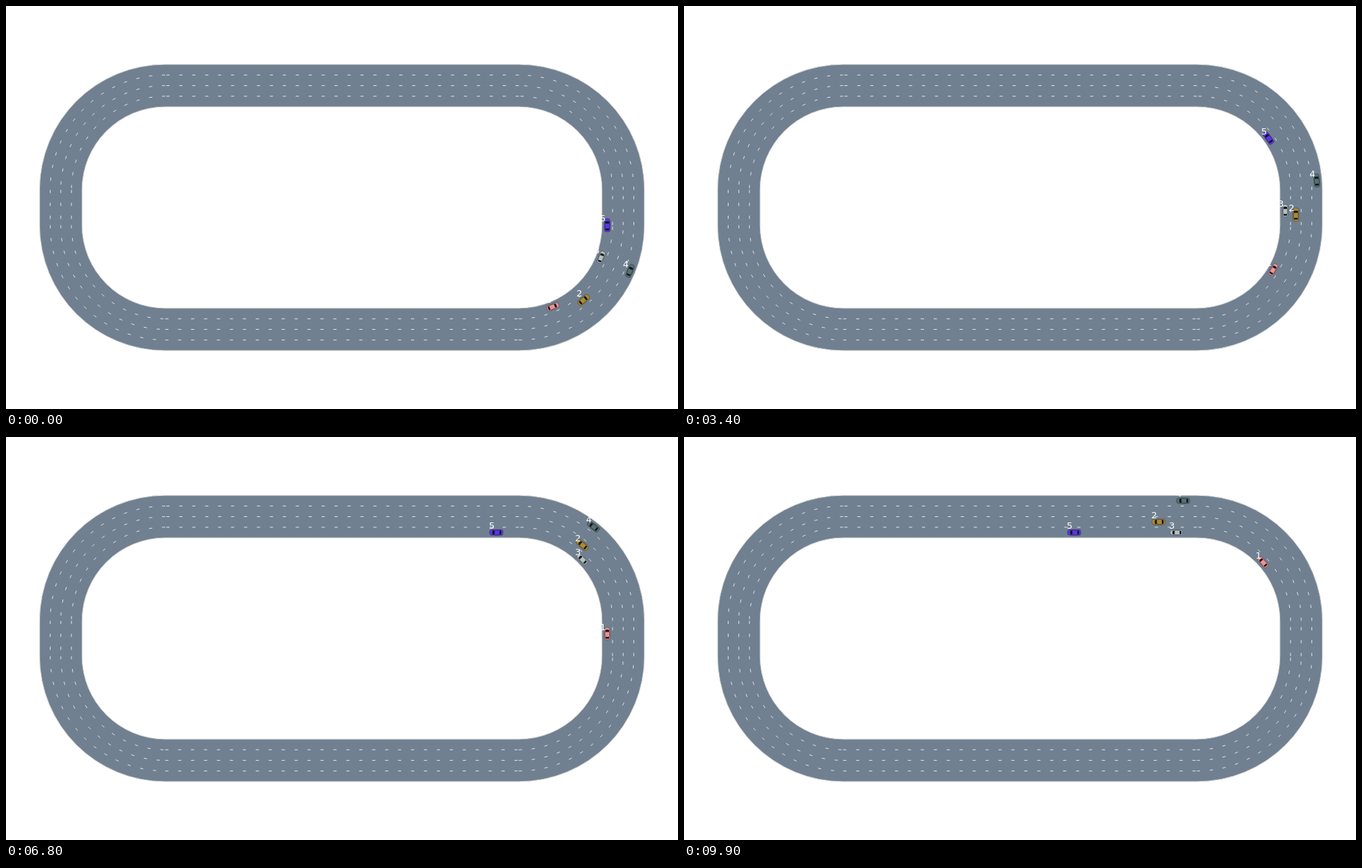
An HTML page for the animation above (10000 ms loop, 966x580 px).

```html
<!DOCTYPE html>
<html lang="en">
<head>
<meta charset="utf-8">
<title>Ring road traffic</title>
<style>
  html, body { margin: 0; width: 100%; height: 100%; overflow: hidden; background: #fff; }
  svg { display: block; width: 966px; height: 580px; }
  text { font: 13px "DejaVu Sans", sans-serif; fill: #fff; text-anchor: middle; }
</style>
</head>
<body>
<svg id="stage" viewBox="0 0 966 580"></svg>
<script>
const stage = document.getElementById('stage');
// A stadium of 100 m by 10 m straights, 25 m bends and four 3 m lanes, filling 90% of the width.
const METRE = 966 * 0.9 / 171;
const LENGTH = 100 * METRE, SIDE = 10 * METRE, LANE = 3 * METRE;
const INNER = 23.5 * METRE, OUTER = 35.5 * METRE;
const LEFT = 483 - LENGTH / 2, RIGHT = 483 + LENGTH / 2;
const TOP = 290 - SIDE / 2, BOTTOM = 290 + SIDE / 2;
const DASH = 0.9144 * METRE, GAP = 3 * DASH;
const STEP = 100, LOOP = 10000;

function add(parent, tag, attrs, text) {
  const node = document.createElementNS('http://www.w3.org/2000/svg', tag);
  for (const key in attrs) node.setAttribute(key, attrs[key]);
  if (text) node.textContent = text;
  return parent.appendChild(node);
}

function ring(radius, fill) {
  add(stage, 'rect', {
    x: LEFT - radius, y: TOP - radius, rx: radius,
    width: LENGTH + 2 * radius, height: SIDE + 2 * radius,
    fill, stroke: '#d3d3d3', 'stroke-width': 1
  });
}

// Every straight and bend starts its own dash pattern, in driving direction.
function laneMarks(r) {
  const arc = (x0, y0, x1, y1) => `M${x0} ${y0}A${r} ${r} 0 0 0 ${x1} ${y1}`;
  const parts = [
    `M${RIGHT} ${TOP - r}H${LEFT}`, `M${LEFT} ${BOTTOM + r}H${RIGHT}`,
    `M${LEFT - r} ${TOP}V${BOTTOM}`, `M${RIGHT + r} ${BOTTOM}V${TOP}`,
    arc(RIGHT + r, TOP, RIGHT, TOP - r), arc(LEFT, TOP - r, LEFT - r, TOP),
    arc(LEFT - r, BOTTOM, LEFT, BOTTOM + r), arc(RIGHT, BOTTOM + r, RIGHT + r, BOTTOM)
  ];
  for (const d of parts) {
    add(stage, 'path', {
      d, fill: 'none', stroke: '#fff', 'stroke-width': 0.9,
      'stroke-opacity': 0.9, 'stroke-dasharray': `${DASH} ${GAP}`
    });
  }
}

// Distance along the lane, zero at the lower end of the right straight.
const knots = [0, 12, 33, 47, 66, 86, 97];
const cars = [
  { lane: 1, length: 18.8, width: 8.6, color: '#ee9292', path: [-149.3, -116.5, -66.9, -28.7, 32.5, 103.8, 143.3] },
  { lane: 2, length: 20.2, width: 9, color: '#ac8a30', path: [-122, -80.3, 15.3, 83, 175.6, 275, 329.5] },
  { lane: 1, length: 18.8, width: 8.4, color: '#b4c0c0', path: [-47.2, -27.7, 21, 72.1, 149, 233, 280] },
  { lane: 4, length: 20.2, width: 8.8, color: '#56706f', path: [-67.4, -22.6, 64.4, 124.1, 207, 294, 342.1] },
  { lane: 1, length: 20.2, width: 9, color: '#5a35e8', path: [0, 41, 130.5, 195.2, 283, 376, 427] }
];

function slopes(values) {
  const last = knots.length - 1;
  const chord = i => (values[i + 1] - values[i]) / (knots[i + 1] - knots[i]);
  const inner = values.map((_, i) => {
    if (i === 0 || i === last) return 0;
    const before = knots[i] - knots[i - 1], after = knots[i + 1] - knots[i];
    return (chord(i - 1) * after + chord(i) * before) / (before + after);
  });
  inner[0] = (3 * chord(0) - inner[1]) / 2;
  inner[last] = chord(last - 1);
  return inner;
}

function distance(car, n) {
  let i = 0;
  while (i < knots.length - 2 && n > knots[i + 1]) i++;
  const span = knots[i + 1] - knots[i], u = (n - knots[i]) / span, v = 1 - u;
  return v * v * (1 + 2 * u) * car.path[i] + u * u * (3 - 2 * u) * car.path[i + 1]
    + span * u * v * (v * car.slope[i] - u * car.slope[i + 1]);
}

function place(s, r) {
  const bend = r * Math.PI / 2;
  const onBend = (angle, cy) => ({
    x: RIGHT + r * Math.cos(angle), y: cy - r * Math.sin(angle), turn: -90 - angle * 180 / Math.PI
  });
  if (s < 0) return onBend(s / r, BOTTOM);
  if (s < SIDE) return { x: RIGHT + r, y: BOTTOM - s, turn: -90 };
  if (s < SIDE + bend) return onBend((s - SIDE) / r, TOP);
  return { x: RIGHT - (s - SIDE - bend), y: TOP - r, turn: -180 };
}

// The car points along +x.
function drawCar(car) {
  const body = add(stage, 'g', {});
  const l = car.length / 2, w = car.width / 2;
  add(body, 'path', {
    d: `M${-l + 2} ${-w + .4}H${l - 4}Q${l - .4} ${-w + .5} ${l - .4} 0Q${l - .4} ${w - .5} ${l - 4} ${w - .4}H${-l + 2}Q${-l + .4} ${w - .5} ${-l + .4} 0Q${-l + .4} ${-w + .5} ${-l + 2} ${-w + .4}Z`,
    fill: car.color, stroke: '#2a2a30', 'stroke-opacity': 0.55, 'stroke-width': 0.8
  });
  const glass = { fill: '#15161c' };
  add(body, 'path', { d: `M2.2 ${-w + 1.9}L5 ${-w + 1.2}Q6.2 0 5 ${w - 1.2}L2.2 ${w - 1.9}Q2.8 0 2.2 ${-w + 1.9}Z`, ...glass });
  add(body, 'path', { d: `M-4.6 ${-w + 1.9}L-7 ${-w + 1.4}Q-7.8 0 -7 ${w - 1.4}L-4.6 ${w - 1.9}Q-5 0 -4.6 ${-w + 1.9}Z`, ...glass });
  for (const side of [-1, 1]) {
    add(body, 'path', {
      d: `M-5 ${side * (w - 1.1)}H3`, stroke: '#15161c', 'stroke-opacity': 0.55, 'stroke-width': 0.7
    });
  }
  return body;
}

ring(OUTER, '#708090');
ring(INNER, '#fff');
for (let i = 1; i < 4; i++) laneMarks(INNER + i * LANE);

cars.forEach((car, i) => {
  car.radius = INNER + (car.lane - 0.5) * LANE;
  car.slope = slopes(car.path);
  car.body = drawCar(car);
  car.label = add(stage, 'text', {}, String(i + 1));
});

function render(ms) {
  const tick = Math.floor((ms % LOOP) / STEP);
  // The traffic pauses for one tick at 600 ms and at 4600 ms.
  const n = tick - (tick >= 6) - (tick >= 46);
  for (const car of cars) {
    const { x, y, turn } = place(distance(car, n), car.radius);
    car.body.setAttribute('transform', `translate(${x} ${y}) rotate(${turn})`);
    car.label.setAttribute('x', x - 6.2);
    car.label.setAttribute('y', y - 5.4);
  }
}

const start = performance.now();
function loop() {
  render(performance.now() - start);
  requestAnimationFrame(loop);
}
loop();
</script>
</body>
</html>
```
